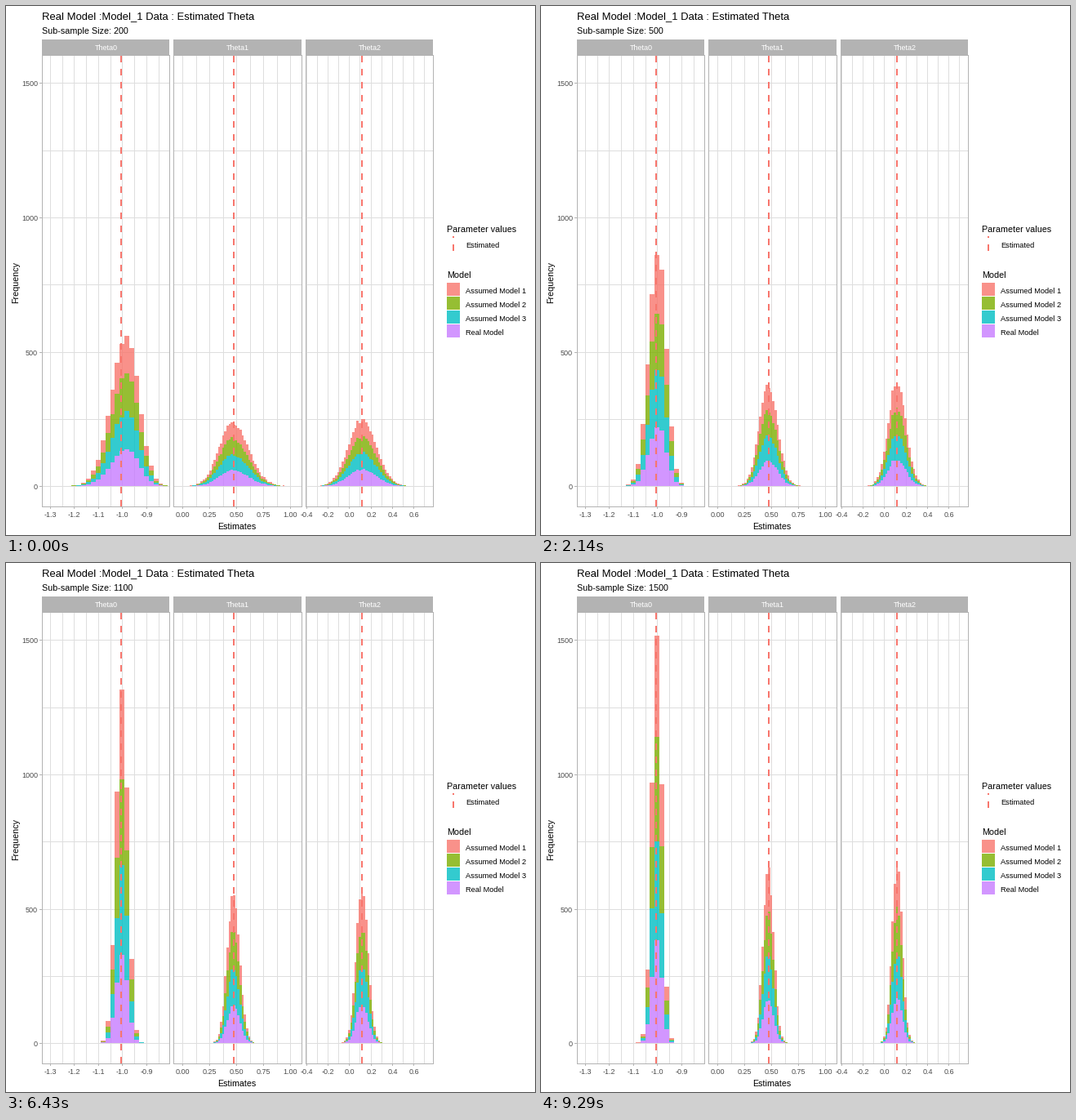
A matplotlib script that plays this animation: 648x648 px, repeating every 10000 ms.

```python
from collections import defaultdict

import numpy as np
import matplotlib.pyplot as plt
from matplotlib.animation import FuncAnimation
from matplotlib.collections import PolyCollection

plt.rcParams["font.family"] = "Liberation Sans"

STAGE, LOOP, STEP = 648, 10000, 40
SIZES = range(200, 1501, 100)
TOP, BOTTOM = 60, 613
BIN = 0.02
GRID, FRAME, INK, LINE = "#dedede", "#b3b3b3", "#4d4d4d", "#f8766d"
MODELS = {"Assumed Model 1": "#f8766d", "Assumed Model 2": "#7cae00",
          "Assumed Model 3": "#00bfc4", "Real Model": "#c77cff"}

# name, left, right, x of zero, px per unit, first grid line, grid step,
# label format, x of the estimate
PANELS = [
    ("Theta0", 44, 200, 437.75, 295.0, -1.3, 0.05, "%.1f", 140),
    ("Theta1", 205, 362, 216.5, 132.0, 0.0, 0.125, "%.2f", 278),
    ("Theta2", 367, 523, 420.7, 131.7, -0.4, 0.1, "%.1f", 435),
]


def y_px(count):
    return int(588.6 - 0.3292 * count)


def bells(n):
    """Mode, spread and skew of the three estimates at sample size n."""
    root = np.sqrt(n)
    return [(-1 + 65 / n ** 1.5, 0.81 / root, -2.4 / root),
            (0.475 - 2.6 / n, 1.9 / root, 20 / n),
            (0.122, 1.82 / root, 4 / n)]


def bar_counts(mode, sd, skew, rng):
    """Histogram of 4000 estimates: two half-normals plus sampling noise."""
    x = np.arange(-70, 55) * BIN
    side = np.where(x < mode, 1 - skew, 1 + skew) * sd
    counts = np.exp(-0.5 * ((x - mode) / side) ** 2)
    counts *= 4000 / counts.sum()
    noise = 0.3 * np.sqrt(counts) * rng.standard_normal(len(x))
    return x, np.maximum(counts + noise, 0)


def box(x0, y0, x1, y1):
    return [(x0, y0), (x1, y0), (x1, y1), (x0, y1)]


def stack(n):
    """Boxes of every bar, grouped by model from top to bottom."""
    rng = np.random.default_rng(n)
    groups = [[] for _ in MODELS]
    for (_, _, _, zero, unit, *_), bell in zip(PANELS, bells(n)):
        for x, total in zip(*bar_counts(*bell, rng)):
            left = int(zero + (x - BIN / 2) * unit)
            right = int(zero + (x + BIN / 2) * unit)
            cuts = np.linspace(1, 0, 5)
            cuts[1:4] += 0.006 * rng.standard_normal(3)
            ys = [y_px(total * c) for c in cuts]
            for group, y0, y1 in zip(groups, ys, ys[1:]):
                if y1 > y0:
                    group.append(box(left, y0, right, y1))
    return groups


fig = plt.figure(figsize=(9, 9), dpi=72, facecolor="white")
ax = fig.add_axes([0, 0, 1, 1])
ax.set(xlim=(0, STAGE), ylim=(STAGE, 0))
ax.axis("off")
shapes = defaultdict(list)


def rect(x0, y0, x1, y1, color, z=1):
    shapes[color, z].append(box(x0, y0, x1, y1))


def add_boxes(boxes, color, z, alpha=1):
    layer = PolyCollection(boxes, facecolors=color, edgecolors="none",
                           alpha=alpha, antialiaseds=False, zorder=z)
    ax.add_collection(layer, autolim=False)
    return layer


def text(x, y, s, size, color="black", ha="left", **kw):
    return ax.text(x, y, s, fontsize=size, color=color, ha=ha,
                   va="baseline", zorder=6, **kw)


def dashes(x, top, bottom):
    for y in range(bottom, top, -16):
        rect(x, max(y - 8, top), x + 2, y, LINE, 4)


def draw_panel(name, left, right, zero, unit, start, step, fmt, estimate):
    for count in range(0, 1501, 250):
        y = y_px(count)
        rect(left, y, right, y + 1, GRID)
    for i in range(12):
        value = start + i * step + 1e-6
        x = int(zero + value * unit)
        if x >= right - 8:
            break
        rect(x, TOP, x + 1, BOTTOM, GRID)
        if i % 2 == 0:
            rect(x, BOTTOM, x + 1, BOTTOM + 3, FRAME)
            text(x + 0.5, 626, fmt % value, 9, INK, "center")
    dashes(estimate, TOP + 1, BOTTOM)
    rect(left, 41, right, TOP, FRAME, 5)
    for y in (TOP, BOTTOM):
        rect(left, y, right + 1, y + 1, FRAME, 5)
    for x in (left, right):
        rect(x, TOP, x + 1, BOTTOM, FRAME, 5)
    text((left + right + 1) / 2, 54.5, name, 9, "white", "center")


for panel in PANELS:
    draw_panel(*panel)

for count in range(0, 1501, 500):
    y = y_px(count)
    rect(41, y, 44, y + 1, FRAME)
    text(39, y + 4, str(count), 9, INK, "right")

text(44, 16, "Real Model :Model_1 Data : Estimated Theta", 13)
subtitle = text(44, 34, "", 10.8)
text(283, 641, "Estimates", 10.6, ha="center")
text(15, 338, "Frequency", 10.8, ha="center", rotation=90,
     rotation_mode="anchor")

text(540, 277, "Parameter values", 10.7)
dashes(547, 282, 300)
text(563, 296, "Estimated", 9.2)
text(540, 333, "Model", 10.7)

for (color, z), boxes in shapes.items():
    add_boxes(boxes, color, z)

layers = []
for i, (name, color) in enumerate(MODELS.items()):
    y = int(339 + 17.28 * i)
    add_boxes([box(540, y, 556, y + 16)], color, 1, 0.8)
    text(563, y + 13, name, 9.2)
    layers.append(add_boxes([], color, 3, 0.8))

STACKS = [stack(n) for n in SIZES]


def draw(frame):
    # a step belongs to the size reached by its end
    last = (frame + 1) * STEP - 1
    i = min(last * len(SIZES) // LOOP, len(SIZES) - 1)
    if (frame + 1) * STEP > LOOP:
        i = len(SIZES) - 1
    for layer, boxes in zip(layers, STACKS[i]):
        layer.set_verts(boxes)
    subtitle.set_text(f"Sub-sample Size: {SIZES[i]}")
    return [*layers, subtitle]


anim = FuncAnimation(fig, draw, frames=LOOP // STEP, init_func=lambda: draw(0),
                     interval=STEP, repeat=True, repeat_delay=0)
plt.show()
```
